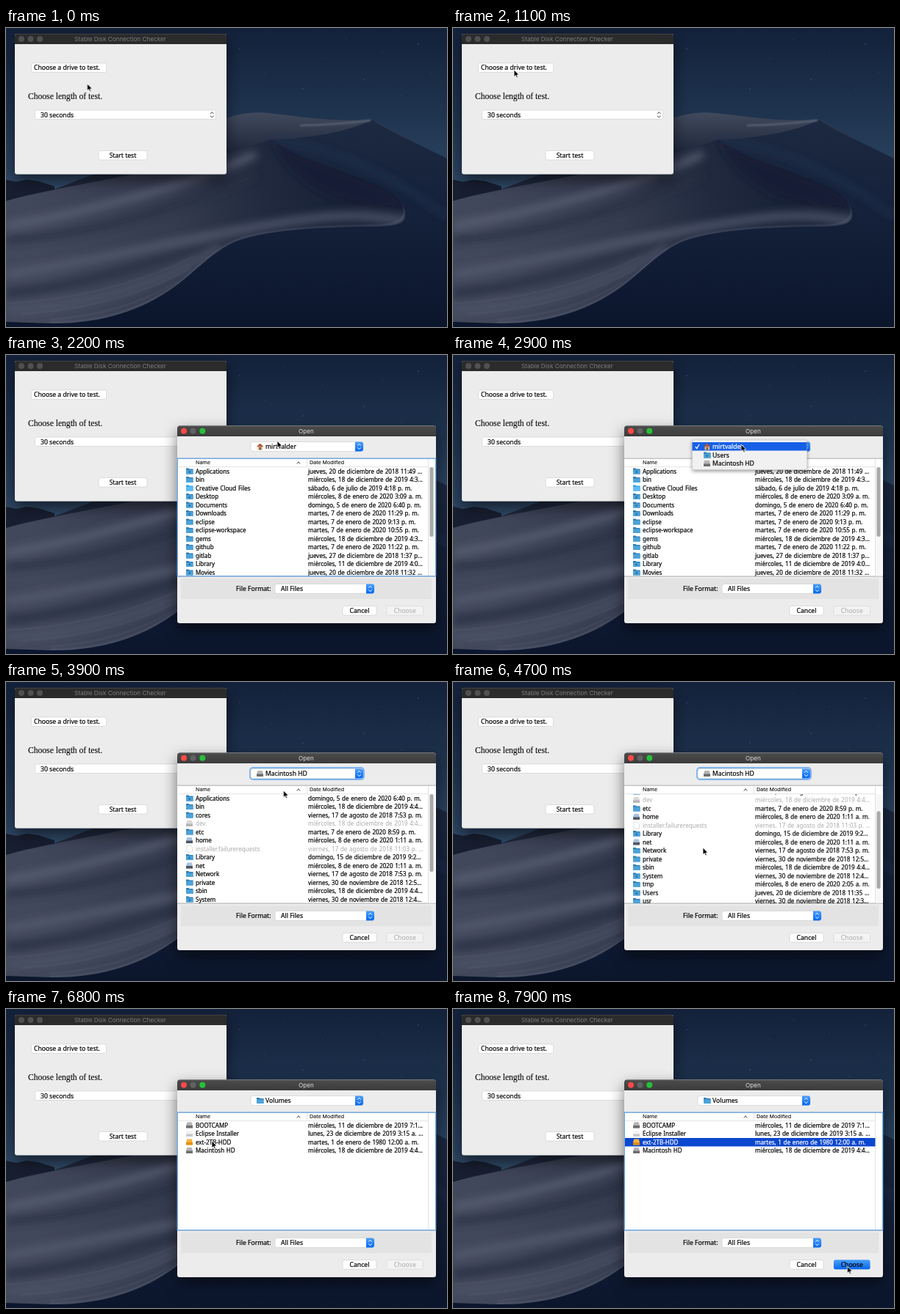
An HTML page for the animation above (8 s loop, 600 px wide and 408 px high).

```html
<!DOCTYPE html>
<html lang="en">
<head>
<meta charset="utf-8">
<title>Disk checker</title>
<style>
html, body { margin: 0; width: 100%; height: 100%; overflow: hidden; background: #0d1933; }
svg { display: block; color: #080808; }
text { font: 500 8.6px "Noto Sans", "Open Sans", sans-serif; fill: currentColor; stroke: currentColor; stroke-width: .22; }
.mid { text-anchor: middle; }
.row { font-size: 8px; word-spacing: .6px; }
.head { font-size: 7.1px; stroke-width: .1; }
.title { font: 400 8.2px Inter, sans-serif; text-anchor: middle; stroke: none; }
.serif { font: 400 11.6px "Liberation Serif", serif; stroke-width: .12; }
.faded { color: #a9a9a9; stroke: none; }
.on { color: #fff; }
.btn { fill: #fff; stroke: #cbcbcb; stroke-width: .6; }

.step { animation: 8s step-end infinite; }
#dialog { animation-name: dialog; }
#home { animation-name: home; }
#root { animation-name: root; }
#volumes { animation-name: volumes; }
#popup { animation-name: popup; }
#comboFocus { animation-name: comboFocus; }
#listFocus { animation-name: listFocus; }
#pickVolumes { animation-name: pickVolumes; }
#pickDisk { animation-name: pickDisk; }
#lit { animation-name: lit; }
#bar { animation-name: bar; }
#opt0 { animation-name: opt0; }
#opt1 { animation-name: opt1; }
#opt2 { animation-name: opt2; }
#rootRows { animation: scroll 8s ease-in-out infinite; }
#rootThumb { animation: thumb 8s ease-in-out infinite; }
#cursor { animation: cursor 8s ease-in-out infinite; }

@keyframes dialog { 0% { opacity: 0 } 15%, to { opacity: 1 } }
@keyframes home { 0% { opacity: 1 } 43.75%, to { opacity: 0 } }
@keyframes root { 0% { opacity: 0 } 43.75% { opacity: 1 } 75%, to { opacity: 0 } }
@keyframes volumes { 0% { opacity: 0 } 75%, to { opacity: 1 } }
@keyframes popup { 0% { opacity: 0 } 32.5% { opacity: 1 } 43.75%, to { opacity: 0 } }
@keyframes comboFocus { 0% { opacity: 0 } 43.75% { opacity: 1 } 66.25%, to { opacity: 0 } }
@keyframes listFocus { 0% { opacity: 1 } 32.5% { opacity: 0 } 66.25%, to { opacity: 1 } }
@keyframes pickVolumes { 0% { opacity: 0 } 66.25% { opacity: 1 } 75%, to { opacity: 0 } }
@keyframes pickDisk { 0% { opacity: 0 } 87.5%, to { opacity: 1 } }
@keyframes lit { 0% { opacity: 0 } 66.25% { opacity: 1 } 75% { opacity: 0 } 87.5%, to { opacity: 1 } }
@keyframes bar {
  0% { transform: translateY(0) }
  38.75% { transform: translateY(11.5px) }
  40%, to { transform: translateY(23px) }
}
@keyframes opt0 { 0% { color: #fff } 38.75%, to { color: #080808 } }
@keyframes opt1 { 0% { color: #080808 } 38.75% { color: #fff } 40%, to { color: #080808 } }
@keyframes opt2 { 0% { color: #080808 } 40%, to { color: #fff } }
@keyframes scroll {
  0%, 54% { transform: translateY(0) }
  63%, to { transform: translateY(-58.5px) }
}
@keyframes thumb {
  0%, 54% { transform: translateY(0) }
  63%, to { transform: translateY(42px) }
}
@keyframes cursor {
  0%, 1% { transform: translate(110.5px, 76px) }
  11% { transform: translate(84px, 62px) }
  13.5%, 17% { transform: translate(83px, 57px) }
  30%, 37.5% { transform: translate(392px, 122px) }
  40.5%, 49% { transform: translate(377.5px, 148px) }
  54%, 61% { transform: translate(340px, 226px) }
  66%, 76.5% { transform: translate(281.5px, 293.5px) }
  82%, 88.5% { transform: translate(280px, 180px) }
  97.5%, to { transform: translate(536.5px, 351px) }
}
</style>
</head>
<body>
<svg width="600" height="408" viewBox="0 0 600 408">
  <defs>
    <linearGradient id="sky" x2="0" y2="1">
      <stop stop-color="#13213a"/><stop offset=".5" stop-color="#1f344f"/><stop offset="1" stop-color="#324c69"/>
    </linearGradient>
    <linearGradient id="back" gradientUnits="userSpaceOnUse" x1="0" y1="114" x2="0" y2="170">
      <stop stop-color="#424a5e"/><stop offset=".4" stop-color="#343c50"/><stop offset="1" stop-color="#1e273b"/>
    </linearGradient>
    <linearGradient id="shade" gradientUnits="userSpaceOnUse" x1="0" y1="125" x2="0" y2="408">
      <stop stop-color="#1d2940"/><stop offset=".4" stop-color="#16223b"/><stop offset="1" stop-color="#0b162d"/>
    </linearGradient>
    <linearGradient id="front" gradientUnits="userSpaceOnUse" x1="40" y1="300" x2="460" y2="200">
      <stop stop-color="#42485b"/><stop offset=".45" stop-color="#343b4f"/><stop offset=".75" stop-color="#20293e"/><stop offset="1" stop-color="#172136"/>
    </linearGradient>
    <linearGradient id="bar0" x2="0" y2="1"><stop stop-color="#4c4c4c"/><stop offset="1" stop-color="#3b3b3b"/></linearGradient>
    <linearGradient id="blue" x2="0" y2="1"><stop stop-color="#4b9ffa"/><stop offset="1" stop-color="#0768f1"/></linearGradient>
    <filter id="soft" x="-20%" y="-40%" width="140%" height="180%"><feGaussianBlur stdDeviation="6"/></filter>
    <filter id="fine" x="-20%" y="-40%" width="140%" height="180%"><feGaussianBlur stdDeviation="1.3"/></filter>
    <filter id="shadow" x="-20%" y="-20%" width="140%" height="150%">
      <feDropShadow dx="0" dy="8" stdDeviation="10" flood-color="#000" flood-opacity=".55"/>
    </filter>
    <filter id="drop" x="-20%" y="-30%" width="140%" height="180%">
      <feDropShadow dx="0" dy="2" stdDeviation="2.5" flood-color="#000" flood-opacity=".4"/>
    </filter>
    <clipPath id="listClip"><path d="M234 153H584V301.5H234Z"/></clipPath>
    <clipPath id="frontClip"><path id="frontShape" d="M0 236C70 215 240 194 361 152C395 176 450 190 500 211C530 222 546 244 543 259C539 271 517 271 490 271C420 272 365 276 325 287C285 298 262 330 228 354C185 385 130 404 60 403L0 401Z"/></clipPath>
  </defs>

  <g id="wallpaper">
    <rect width="600" height="240" fill="url(#sky)"/>
    <g id="stars" fill="#9db4d0"></g>
    <path d="M0 207L14 210L28 207L44 209L66 216V245H0Z" fill="#171e30"/>
    <path d="M66 220C120 200 220 160 300 123Q325 114 350 115.500C390 119 440 129 498 125L600 180V300H66Z" fill="url(#back)"/>
    <path d="M498 125C530 146 560 158 600 178V408H0V400L361 153C420 150 470 140 498 125Z" fill="url(#shade)"/>
    <path d="M400 133Q450 132 496 126" fill="none" stroke="#566075" stroke-width="2.500" filter="url(#fine)"/>
    <path d="M361 153C430 158 520 196 600 258" fill="none" stroke="#223250" stroke-width="5" filter="url(#soft)"/>
    <use href="#frontShape" fill="url(#front)"/>
    <g clip-path="url(#frontClip)" fill="none">
      <g filter="url(#soft)">
        <path d="M361 152C395 176 450 190 500 211C530 222 546 240 540 246C480 252 400 228 361 152Z" fill="#141e34"/>
        <path d="M0 270C120 250 260 210 340 172" stroke="#5a6074" stroke-width="9"/>
        <path d="M0 290C140 280 250 238 340 200" stroke="#272f43" stroke-width="8"/>
        <path d="M0 336C120 318 230 290 360 268S500 262 545 262" stroke="#555c71" stroke-width="9"/>
        <path d="M0 362C120 350 200 318 290 290" stroke="#2b3347" stroke-width="12"/>
        <path d="M0 385C110 380 210 350 290 300" stroke="#50566a" stroke-width="7"/>
      </g>
      <g filter="url(#fine)" stroke="#6f7588" opacity=".45">
        <path d="M0 376C100 370 190 345 255 312"/><path d="M20 390C110 385 190 362 250 328"/>
        <path d="M60 398C130 392 180 378 232 346"/>
      </g>
      <path d="M538 233C552 264 531 270 490 270C420 271 365 275 325 286C285 297 262 329 228 353C184 384 130 403 60 402" stroke="#666d82" stroke-width="2.500" opacity=".4" filter="url(#fine)"/>
    </g>
  </g>

  <g id="main">
    <rect x="12" y="8" width="288" height="191.500" rx="3" fill="#ececec" filter="url(#shadow)"/>
    <path d="M12 22V11Q12 8 15 8H297Q300 8 300 11V22Z" fill="#2b2b2b"/>
    <path d="M15 8.300H297" stroke="#555" stroke-width=".6"/>
    <g fill="#505050"><circle cx="21" cy="15" r="4"/><circle cx="33.500" cy="15" r="4"/><circle cx="46" cy="15" r="4"/></g>
    <text class="title" x="155.500" y="18" color="#7d7d7d">Stable Disk Connection Checker</text>
    <rect class="btn" x="34.500" y="48" width="102" height="12.500" rx="2.500"/>
    <text x="38" y="57.200">Choose a drive to test.</text>
    <text class="serif" x="30" y="97">Choose length of test.</text>
    <rect class="btn" x="39.500" y="112" width="246" height="12.500" rx="2.500"/>
    <text x="47" y="121.500">30 seconds</text>
    <path d="M278 117.200L280.300 114.600L282.600 117.200M278 119.600L280.300 122.200L282.600 119.600" fill="none" stroke="#333" stroke-width=".9"/>
    <rect class="btn" x="126" y="167.500" width="66" height="12.500" rx="2.500"/>
    <text class="mid" x="159" y="176.800">Start test</text>
  </g>

  <g id="dialog" class="step">
    <rect x="233" y="96.500" width="352" height="269.500" rx="3.500" fill="#ececec" filter="url(#shadow)"/>
    <path d="M233 111V100Q233 96.500 236.500 96.500H581.500Q585 96.500 585 100V111Z" fill="url(#bar0)"/>
    <path d="M236 96.800H582" stroke="#777" stroke-width=".6"/>
    <circle cx="242" cy="103.700" r="4" fill="#fb4948"/><circle cx="254.500" cy="103.700" r="4" fill="#626262"/><circle cx="267.300" cy="103.700" r="4" fill="#25c138"/>
    <text class="title" x="408.500" y="106.800" color="#ddd">Open</text>

    <rect id="comboFocus" class="step" x="332" y="117" width="155" height="16" rx="4" fill="none" stroke="#7fb2ee" stroke-width="2"/>
    <rect class="btn" x="333" y="118.500" width="153" height="13" rx="3"/>
    <g id="stepper">
      <path d="M475 118.500H483Q486 118.500 486 121.500V128.500Q486 131.500 483 131.500H475Z" fill="url(#blue)"/>
      <path d="M478.300 123.600L480.500 121.200L482.700 123.600M478.300 126.400L480.500 128.800L482.700 126.400" fill="none" stroke="#fff"/>
    </g>

    <rect x="233" y="141" width="352" height="161" fill="#fff"/>
    <path d="M233 141.200H585M233 302H585" stroke="#8d8d8d" stroke-width=".7"/>
    <path d="M234 152.700H574M409.500 142V152M574.500 142V301" stroke="#d6d6d6" stroke-width=".7"/>
    <text class="head" x="258" y="149.400">Name</text>
    <text class="head" x="413" y="149.400">Date Modified</text>
    <path d="M395.800 148.500L398 145.800L400.200 148.500" fill="none" stroke="#333" stroke-width=".9"/>

    <g id="home" class="step"></g>
    <g id="root" class="step"></g>
    <g id="volumes" class="step"></g>
    <rect id="listFocus" class="step" x="233.300" y="141.200" width="351.400" height="160.600" fill="none" stroke="#6ea9e6" stroke-width="1.300"/>

    <rect x="238" y="305" width="341" height="28" fill="#e3e3e3"/>
    <text x="313" y="322.300">File Format:</text>
    <rect class="btn" x="366" y="312.500" width="135" height="13" rx="3"/>
    <text x="374" y="322">All Files</text>
    <use href="#stepper" x="15" y="194"/>
    <rect class="btn" x="458" y="342.500" width="46" height="12.500" rx="2.500"/>
    <text class="mid" x="481" y="351.800">Cancel</text>
    <rect x="518" y="342.500" width="49.500" height="12.500" rx="2.500" fill="#f3f3f3" stroke="#d6d6d6" stroke-width=".6"/>
    <text class="mid faded" x="542.700" y="351.800">Choose</text>
    <g id="lit" class="step">
      <rect x="518" y="342.200" width="49.500" height="13" rx="2.500" fill="url(#blue)"/>
      <text class="mid" x="542.700" y="351.800">Choose</text>
    </g>

    <g id="popup" class="step">
      <rect x="325.500" y="116" width="156" height="40.500" rx="2.500" fill="#f1f1f1" stroke="#bdbdbd" stroke-width=".5" filter="url(#drop)"/>
      <rect id="bar" class="step" x="325.500" y="119" width="156" height="11.500" fill="#1760e6"/>
      <g id="options"></g>
    </g>
  </g>

  <path id="cursor" d="M0 0V9.600L2.200 7.600L3.700 11L5.300 10.300L3.800 7.100L6.700 6.900Z" fill="#000" stroke="#fff" stroke-width=".8"/>
</svg>

<script>
const ROW = 11.5, TOP = 153;
const put = (id, html) => document.getElementById(id).innerHTML = html;

const drive = (body, base) =>
  `<path d="M1.300 .5H7.700L9 5V8.500H0V5Z" fill="${body}"/><path d="M0 5H9V8.500H0Z" fill="${base}"/>`;
const folder = (back, face, mark = '') =>
  `<path d="M0 .5H3.500L4.500 1.500H9.500V8.500H0Z" fill="${back}"/><path d="M0 2.700H9.500V8.500H0Z" fill="${face}"/>${mark}`;
const icons = {
  folder: folder('#2f7db4', '#4ba3d8'),
  badge: folder('#2f7db4', '#4ba3d8', '<circle cx="4.700" cy="5.500" r="1.600" fill="#2b79ad"/>'),
  cloud: folder('#2f9fe6', '#5cbdf8'),
  disk: drive('#b4b4b4', '#6e6e6e'),
  net: drive('#a9c2dc', '#4e5561'),
  white: drive('#f3f3f3', '#c9c9c9'),
  orange: drive('#f9b13c', '#e58e12'),
  dim: drive('#d9d9d9', '#b5b5b5'),
  file: '<path d="M1 0H6L8.500 2.500V9H1Z" fill="#fff" stroke="#ccc" stroke-width=".6"/>',
  house: '<path d="M1.500 4H8V9H1.500Z" fill="#d9b98c"/><path d="M0 4.700L4.700 0L9.500 4.700Z" fill="#b5573a"/><path d="M3.800 5.500H5.700V9H3.800Z" fill="#6d4630"/>'
};
const icon = (kind, x, y) => `<g transform="translate(${x} ${y})">${icons[kind]}</g>`;

function row([kind, name, date], i, cls = '') {
  const y = TOP + i * ROW;
  if (kind === 'dim' || kind === 'file') cls = 'faded';
  return icon(kind, 245, y + 1) +
    `<text class="row ${cls}" x="258" y="${y + 8.6}">${name}</text>` +
    `<text class="row ${cls}" x="411" y="${y + 8.6}">${date}</text>`;
}
const rows = list => list.map((r, i) => row(r, i)).join('');
const picked = (id, list, i) =>
  `<g id="${id}" class="step"><rect x="234" y="${TOP + i * ROW}" width="340.500" height="${ROW}" fill="#0b47cf"/>${row(list[i], i, 'on')}</g>`;
const place = (kind, name) => icon(kind, 341, 120.5) + `<text x="353" y="128">${name}</text>`;
const thumb = (id, h) =>
  `<rect x="575" y="153" width="9" height="148.500" fill="#f7f7f7"/><rect id="${id}" x="576.500" y="153" width="5" height="${h}" rx="2.500" fill="#a9a9a9"/>`;
const clip = html => `<g clip-path="url(#listClip)">${html}</g>`;

const user = 'mirtvalder';
const homeList = [
  ['badge', 'Applications', 'jueves, 20 de diciembre de 2018 11:49 ...'],
  ['folder', 'bin', 'miércoles, 18 de diciembre de 2019 4:3...'],
  ['cloud', 'Creative Cloud Files', 'sábado, 6 de julio de 2019 4:18 p. m.'],
  ['badge', 'Desktop', 'miércoles, 8 de enero de 2020 3:09 a. m.'],
  ['badge', 'Documents', 'domingo, 5 de enero de 2020 6:40 p. m.'],
  ['badge', 'Downloads', 'martes, 7 de enero de 2020 11:29 p. m.'],
  ['folder', 'eclipse', 'martes, 7 de enero de 2020 9:13 p. m.'],
  ['folder', 'eclipse-workspace', 'martes, 7 de enero de 2020 10:55 p. m.'],
  ['folder', 'gems', 'miércoles, 18 de diciembre de 2019 4:3...'],
  ['folder', 'github', 'martes, 7 de enero de 2020 11:22 p. m.'],
  ['folder', 'gitlab', 'jueves, 27 de diciembre de 2018 1:37 p...'],
  ['badge', 'Library', 'miércoles, 11 de diciembre de 2019 4:0...'],
  ['badge', 'Movies', 'jueves, 20 de diciembre de 2018 11:32 ...']
];
const rootList = [
  ['badge', 'Applications', 'domingo, 5 de enero de 2020 6:40 p. m.'],
  ['folder', 'bin', 'miércoles, 18 de diciembre de 2019 4:4...'],
  ['folder', 'cores', 'viernes, 17 de agosto de 2018 7:53 p. m.'],
  ['dim', 'dev', 'miércoles, 18 de diciembre de 2019 4:4...'],
  ['folder', 'etc', 'martes, 7 de enero de 2020 8:59 p. m.'],
  ['net', 'home', 'miércoles, 8 de enero de 2020 1:11 a. m.'],
  ['file', 'installer.failurerequests', 'viernes, 17 de agosto de 2018 11:03 p. ...'],
  ['badge', 'Library', 'domingo, 15 de diciembre de 2019 9:2...'],
  ['net', 'net', 'miércoles, 8 de enero de 2020 1:11 a. m.'],
  ['folder', 'Network', 'viernes, 17 de agosto de 2018 7:53 p. m.'],
  ['folder', 'private', 'viernes, 30 de noviembre de 2018 12:5...'],
  ['folder', 'sbin', 'miércoles, 18 de diciembre de 2019 4:4...'],
  ['badge', 'System', 'viernes, 30 de noviembre de 2018 12:4...'],
  ['folder', 'tmp', 'miércoles, 8 de enero de 2020 2:05 a. m.'],
  ['badge', 'Users', 'jueves, 20 de diciembre de 2018 11:35 ...'],
  ['folder', 'usr', 'viernes, 30 de noviembre de 2018 12:3...'],
  ['folder', 'var', 'jueves, 20 de diciembre de 2018 11:35 ...'],
  ['folder', 'Volumes', 'miércoles, 8 de enero de 2020 12:14 a. ...']
];
const volumeList = [
  ['disk', 'BOOTCAMP', 'miércoles, 11 de diciembre de 2019 7:1...'],
  ['white', 'Eclipse Installer', 'lunes, 23 de diciembre de 2019 3:15 a. ...'],
  ['orange', 'ext-2TB-HDD', 'martes, 1 de enero de 1980 12:00 a. m.'],
  ['disk', 'Macintosh HD', 'miércoles, 18 de diciembre de 2019 4:4...']
];

put('home', place('house', user) + clip(rows(homeList)) + thumb('homeThumb', 95));
put('root', place('disk', 'Macintosh HD') +
  clip(`<g id="rootRows">${rows(rootList)}${picked('pickVolumes', rootList, 17)}</g>`) + thumb('rootThumb', 106));
put('volumes', place('folder', 'Volumes') + rows(volumeList) + picked('pickDisk', volumeList, 2));

put('options', [['house', user], ['badge', 'Users'], ['disk', 'Macintosh HD']].map(([kind, name], i) => {
  const y = 119 + i * ROW;
  const tick = i ? '' : '<path d="M329.800 125.200L331.700 127.600L335 122" fill="none" stroke="currentColor" stroke-width="1.200"/>';
  return icon(kind, 341, y + 1.5) + `<g id="opt${i}" class="step">${tick}<text x="353" y="${y + 9}">${name}</text></g>`;
}).join(''));

const stars = [[318, 28], [352, 62], [377, 16], [404, 83], [431, 41], [463, 15], [487, 70], [512, 33], [538, 92], [561, 22], [579, 61], [592, 108]];
put('stars', stars.map(([x, y], i) => `<circle cx="${x}" cy="${y}" r="${i % 3 ? .4 : .6}" opacity=".6"/>`).join(''));
</script>
</body>
</html>
```
